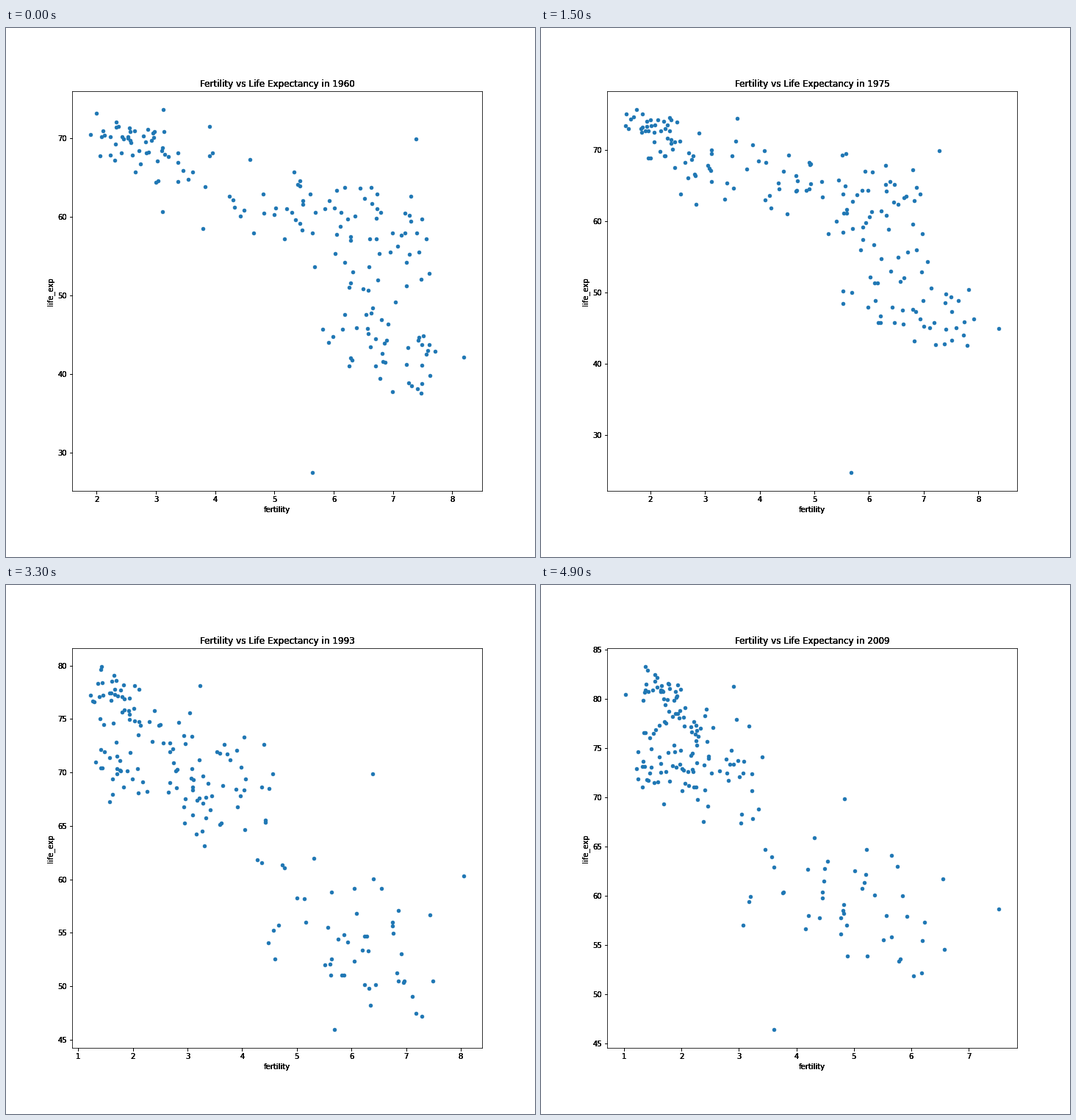
A matplotlib script that plays this animation: 720 px wide and 720 px high, repeating every 5000 ms.

```python
import numpy as np
import matplotlib.pyplot as plt
from matplotlib.animation import FuncAnimation

plt.rcParams["font.family"] = "DejaVu Sans"

FIRST_YEAR, YEARS = 1960, 50

# Edges of the cloud, which set the axis limits.
KEY_YEARS = [1960, 1966, 1975, 1984, 1993, 1999, 2009]
FEWEST_BIRTHS = [1.90, 1.83, 1.55, 1.39, 1.23, 1.00, 1.03]
MOST_BIRTHS = [8.19, 8.20, 8.37, 8.86, 8.05, 7.69, 7.52]
MOST_BIRTHS_LIFE = [42.2, 42.8, 45.0, 56.1, 60.3, 51.4, 58.7]
LONGEST_LIFE = [73.6, 74.3, 75.7, 77.8, 79.9, 81.2, 83.3]
SHORTEST_LIFE = [27.5, 37.2, 40.0, 39.9, 46.0, 43.8, 46.4]
SHORTEST_LIFE_BIRTHS = [5.64, 5.98, 5.67, 7.44, 5.69, 5.52, 3.61]

# Size, fertility (start, end, halfway year, spread at start and end),
# life expectancy (start, end, spread).
GROUPS = [
    (27, 2.8, 1.65, 1970, 0.38, 0.22, 70.4, 80.8, 1.4),
    (20, 2.8, 1.4, 1983, 0.5, 0.18, 67.8, 73.5, 2.1),
    (31, 4.9, 1.9, 1978, 1.1, 0.35, 62.5, 75.5, 3.4),
    (49, 6.7, 2.4, 1987, 0.7, 0.55, 58, 73, 4.2),
    (48, 6.75, 4.4, 1997, 0.55, 1.0, 45, 60, 4.3),
]

rng = np.random.default_rng(12)
TRAITS = [rng.standard_normal((4, group[0])) for group in GROUPS]


def at(year, values):
    return np.interp(year, KEY_YEARS, values)


def mix(start, end, amount):
    return start + (end - start) * amount


def logistic(year, halfway):
    return 1 / (1 + np.exp((halfway - year) / 7))


def dip(year, centre, width, depth):
    return depth * np.exp(-((year - centre) / width) ** 2)


def fold(values, low, high):
    values = low + np.abs(values - low)
    return high - np.abs(high - values)


def edge_points(year, progress):
    losses = dip(year, 1976.5, 2.8, 20.4) + dip(year, 1994, 0.4, 32.4)
    top_births = 1.36 + 1.76 * np.exp((FIRST_YEAR - year) / 10)
    return [
        (at(year, FEWEST_BIRTHS), mix(70.4, 80.5, progress)),
        (at(year, MOST_BIRTHS), at(year, MOST_BIRTHS_LIFE)),
        (top_births, at(year, LONGEST_LIFE)),
        (at(year, SHORTEST_LIFE_BIRTHS), at(year, SHORTEST_LIFE) - losses),
        (mix(7.4, 4.3, logistic(year, 1998)), 69.9),
        (mix(3.9, 2.9, progress), mix(71.5, 81.3, progress)),
    ]


def group_points(group, traits, year, progress):
    _, f_start, f_end, halfway, sd_start, sd_end, l_start, l_end, l_sd = group
    turn = 1.2 * progress
    drifting = traits[:2] * np.cos(turn) + traits[2:] * np.sin(turn)
    births, health = 1.9 * np.tanh(drifting / 1.7)
    health = 0.9 * health - 0.4 * births
    fertility = (mix(f_start, f_end, logistic(year, halfway))
                 + mix(sd_start, sd_end, progress) * births)
    life = mix(l_start, l_end, progress) + l_sd * health
    return np.column_stack([
        fold(fertility, at(year, FEWEST_BIRTHS), at(year, MOST_BIRTHS)),
        fold(life, at(year, SHORTEST_LIFE), at(year, LONGEST_LIFE))])


def all_points(year):
    progress = (year - FIRST_YEAR) / (YEARS - 1)
    crowd = [group_points(group, traits, year, progress)
             for group, traits in zip(GROUPS, TRAITS)]
    return np.vstack([edge_points(year, progress), *crowd])


fig = plt.figure(figsize=(10, 10), dpi=72, facecolor="white")
box = [0.125, 0.125, 0.775, 0.755]
ax = fig.add_axes(box)
# Frameless copies on top darken the antialiased lettering.
layers = [ax] + [fig.add_axes(box, frameon=False, label=f"ink {i}")
                 for i in range(3)]
for layer in layers:
    layer.set(xlabel="fertility", ylabel="life_exp")
dots = ax.scatter([], [], s=20, color="#1f77b4")


def update(frame):
    year = FIRST_YEAR + frame
    points = all_points(year)
    dots.set_offsets(points)
    low, high = points.min(axis=0), points.max(axis=0)
    margin = 0.05 * (high - low)
    limits = np.column_stack([low - margin, high + margin])
    for layer in layers:
        layer.set(xlim=limits[0], ylim=limits[1])
        layer.set_title(f"Fertility vs Life Expectancy in {year}",
                        fontsize=12, pad=6)
    return [dots]


anim = FuncAnimation(fig, update, frames=YEARS, interval=100,
                     repeat=True, repeat_delay=0, blit=False)
plt.show()
```
